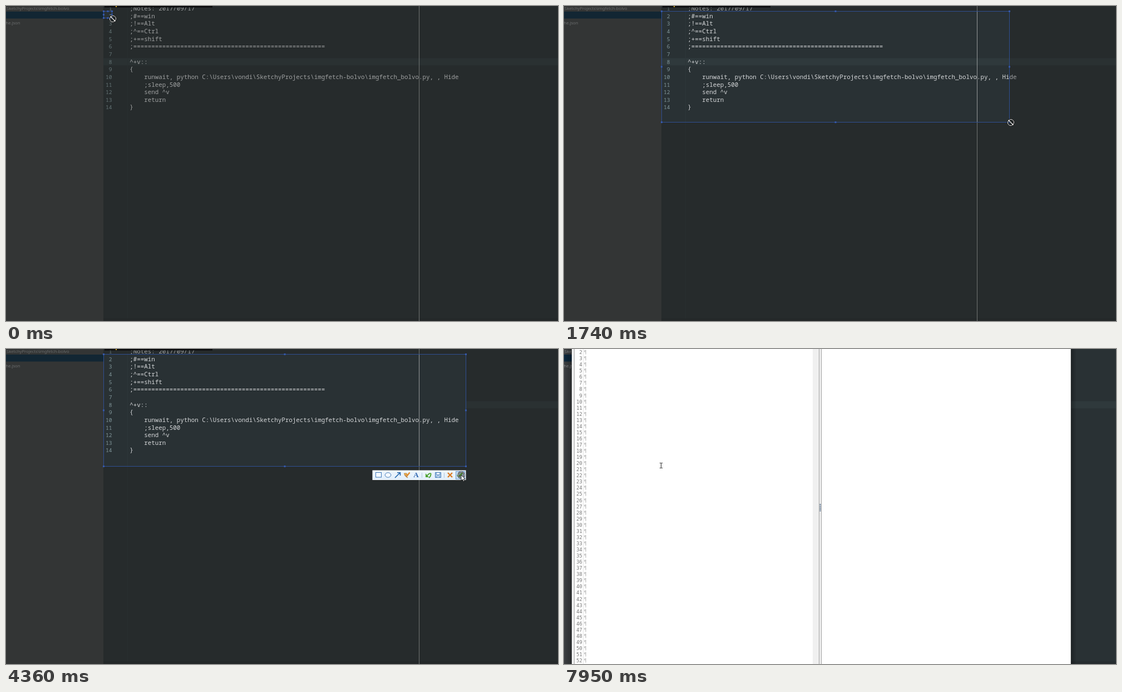
An HTML page that plays this animation: 992x565 px, repeating every 8 s.

```html
<!DOCTYPE html>
<html lang="en">
<head>
<meta charset="utf-8">
<title>Screen capture demo</title>
<style>
  html, body { margin: 0; width: 100%; height: 100%; overflow: hidden; background: #293134; }
  svg { display: block; width: 992px; height: 565px; }
  text { white-space: pre; }
  .code { font: 10.833px "Noto Sans Mono", "Liberation Mono", monospace; fill: #d6d8da; }
  .num { font: 9.7px "Noto Sans Mono", "Liberation Mono", monospace; fill: #81969a; text-anchor: end; }
  .tree { font: 7.6px "Noto Sans", "Open Sans", sans-serif; fill: #8b8e90; }
  .row { font: 8.7px "DejaVu Sans Mono", monospace; fill: #747474; text-anchor: end; }
  .mark { font: 8.7px "DejaVu Sans Mono", monospace; fill: #bdbdbd; }
  .tip { font: 7.5px "Noto Sans CJK SC", "Noto Sans CJK", sans-serif; fill: #555; }
</style>
</head>
<body>
<svg viewBox="0 0 992 565" xmlns="http://www.w3.org/2000/svg">
  <defs>
    <linearGradient id="bar" x2="0" y2="1">
      <stop stop-color="#edf5fd"/><stop offset="1" stop-color="#e2effb"/>
    </linearGradient>
    <linearGradient id="shade">
      <stop stop-color="#000" stop-opacity="0"/><stop offset="1" stop-color="#000" stop-opacity=".3"/>
    </linearGradient>
  </defs>

  <g id="editor">
    <rect width="992" height="565" fill="#293134"/>
    <rect id="current" y="93.5" width="817" height="13" fill="#2f393c"/>
    <rect x="218" width="1" height="560" fill="#2d3639"/>
    <rect width="175" height="565" fill="#3c3f41"/>
    <rect y="10" width="175" height="12.5" fill="#0d293e"/>
    <rect x="175" y="560.5" width="817" height="4.5" fill="#262c2f"/>
    <text class="tree" x="1" y="6.7">SketchyProjects\imgfetch-bolvo</text>
    <text class="tree" x="-.5" y="32.7">he.json</text>
    <g id="lines"></g>
    <rect x="742" width="1" height="565" fill="#959a9b"/>
  </g>

  <g id="capture">
    <path id="dim" fill="#1e1e1c" fill-opacity=".3" fill-rule="evenodd"/>
    <rect x="177" width="194" height="2.5" fill="#08090a"/>
    <rect id="label" x="177" width="21" height="1.6" fill="#fff"/>
    <rect x="197" width="2" height="2" fill="#c9a227"/>
    <path id="frame" fill="none" stroke="#2f4f92"/>
    <path id="grips" fill="#3558a8"/>
    <g id="tools" fill="none" stroke="#3f78b8">
      <rect x="658.5" y="217.5" width="168" height="17.5" fill="#fafdff" stroke="none"/>
      <rect x="659.5" y="218.5" width="166" height="15.5" fill="url(#bar)" stroke="none"/>
      <rect id="hover" x="808.5" y="219.5" width="16" height="14" fill="#c3daf0" stroke="#6f9fcf"/>
      <rect x="664.5" y="221.5" width="10" height="8.5" fill="#f6fbff"/>
      <ellipse cx="686.5" cy="226" rx="5.3" ry="4.2" fill="#f6fbff"/>
      <path d="M699 231L708 222M703 221.7H708.5V227" stroke="#2467ae" stroke-width="1.6"/>
      <path d="M715.5 223H720L721.5 226L716.5 226.5Z" fill="#f0b04a" stroke="#a66a25" stroke-width=".7"/>
      <path d="M725.5 221.5L719 229.5" stroke="#e08a2c" stroke-width="2.4"/>
      <path d="M717 227L722 231" stroke="#b98546" stroke-width="1.4"/>
      <text x="737" y="230.3" text-anchor="middle" font-family="Liberation Serif, serif" font-size="13" font-weight="bold" fill="#2a62ad" stroke="none">A</text>
      <path d="M747.5 222V231M787.5 222V231" stroke="#b4c8db"/>
      <path d="M757 227Q761 222 763.5 223.5Q764 228 760 231" stroke="#4da32f" stroke-width="1.8"/>
      <path d="M754 223V230H760Z" fill="#4da32f" stroke="none"/>
      <path d="M771.5 221.5H781.5V230.5H771.5Z" fill="#b9d3ec"/>
      <path d="M773.5 222V225.5H779.5V222M774 230V228H779V230" fill="#fff" stroke-width=".8"/>
      <path d="M794 222L802 230M802 222L794 230" stroke="#dd7d26" stroke-width="2.4"/>
      <path d="M811 226L814 229L820 222.5" stroke="#62b134" stroke-width="2.6"/>
    </g>
    <g id="tip">
      <rect x="818.5" y="237.5" width="18" height="12" fill="#fff" stroke="#8a8a8a"/>
      <text class="tip" x="820" y="246.3">完成</text>
    </g>
  </g>

  <g id="win">
    <rect width="14" height="565" fill="url(#shade)"/>
    <rect x="911" width="10" height="565" fill="url(#shade)" transform="matrix(-1 0 0 1 1832 0)"/>
    <rect x="14" width="897" height="565" fill="#fff"/>
    <rect x="14" width="4" height="565" fill="#f0f0f0"/>
    <rect x="18" width="1" height="565" fill="#a5a5a5"/>
    <rect x="34" width="1" height="565" fill="#e2e2e2"/>
    <rect x="447" width="11" height="565" fill="#f0f0f0"/>
    <rect x="458" width="5" height="565" fill="#f0f0f0"/>
    <path d="M458.5 0V565M462.5 0V565" stroke="#a0a0a0"/>
    <path d="M460.5 278V291" stroke="#27486f" stroke-width="2" stroke-dasharray="1.2 1.2"/>
    <rect x="910" width="1" height="565" fill="#d5d5d5"/>
    <g id="rows"></g>
    <rect id="caret" x="36" width="1" height="11" fill="#000"/>
  </g>

  <g id="mouse">
    <circle id="ring" r="5.6" fill="#1b1f21" fill-opacity=".35" stroke="#111" stroke-width="2.2"/>
    <circle id="halo" r="5.6" fill="none" stroke="#e8e8e8" stroke-width="1"/>
    <path id="size" d="M-5 -5H-.8L-2.2 -3.4L3.4 2.2L5 .8V5H.8L2.2 3.4L-3.4 -2.2L-5 -.8Z" fill="#fff" stroke="#000" stroke-width=".6"/>
    <path id="arrow" d="M0 0V10L2.4 7.9L4.1 11.7L5.8 11L4.1 7.3H7.3Z" fill="#fff" stroke="#000" stroke-width=".8"/>
    <path id="beam" d="M-2.5 -4.5H-.6L0 -4L.6 -4.5H2.5M0 -4V4M-2.5 4.5H-.6L0 4L.6 4.5H2.5" fill="none"/>
  </g>
</svg>

<script>
const LOOP = 8000, LEFT = 175.5, TOP = 9.5;
const $ = id => document.getElementById(id);
const set = (id, attrs) => { for (const k in attrs) $(id).setAttribute(k, attrs[k]); };
const show = (id, on) => { $(id).style.display = on ? "" : "none"; };

function addText(parent, cls, x, y, content) {
  const el = document.createElementNS("http://www.w3.org/2000/svg", "text");
  el.setAttribute("class", cls);
  el.setAttribute("x", x);
  el.setAttribute("y", y);
  el.textContent = content;
  $(parent).append(el);
}

const code = [
  ";Notes: 2017/09/17", ";#==win", ";!==Alt", ";^==Ctrl", ";+==shift",
  ";" + "=".repeat(53), "", "^+v::", "{",
  "    runwait, python C:\\Users\\vondi\\SketchyProjects\\imgfetch-bolvo\\imgfetch_bolvo.py, , Hide",
  "    ;sleep,500", "    send ^v", "    return", "}"
];
code.forEach((line, i) => {
  const y = 8 + 13.65 * i;
  addText("lines", "num", 190.5, y, i + 1);
  addText("lines", "code", 222.3, y, line);
});

const rowY = n => 6 + 11.06 * (n - 2);
for (let n = 2; n <= 52; n++) {
  addText("rows", "row", 32.8, rowY(n) + 3.1, n);
  addText("rows", "mark", 35.8, rowY(n) + 3.1, "¶");
}

// Pointer stops: [time, x, y]
const drag = [
  [0, 192, 23], [150, 216, 33], [300, 250, 58], [420, 292, 87], [570, 342, 114],
  [690, 387, 140], [850, 464, 162], [1020, 522, 175], [1160, 590, 184],
  [1310, 652, 192], [1430, 712, 200], [1590, 774, 206], [1740, 803, 209],
  [1860, 818, 211], [1980, 824, 212], [2130, 826.5, 211]
];
const stops = [
  ...drag, [2690, 824, 221], [2810, 818, 226],
  [4630, 780, 245], [4750, 712.5, 287.5], [4900, 628, 380], [5030, 547.5, 468.5],
  [5180, 521.5, 546.5], [6480, 415.5, 443.5], [6600, 335.5, 368.5], [6760, 255, 325],
  [6880, 189.5, 291.5], [7030, 182, 275], [7150, 177, 262], [7270, 175, 252],
  [7390, 174.5, 248.5], [7950, 174.5, 209]
];
const within = (t, a, b) => t >= a && t < b;
const indexAt = (list, t) => list.findLastIndex(s => s[0] <= t);

function drawSelection(t) {
  const i = indexAt(drag, t);
  const [, cx, cy] = drag[i];
  const [, px, py] = drag[Math.max(0, i - 1)];
  // The corner trails slightly behind a fast pointer.
  const lag = i === drag.length - 1 ? 0 : 0.075;
  const x = i ? Math.round(cx - lag * (cx - px)) - .5 : 190.5;
  const y = i ? Math.round(cy - lag * (cy - py)) - .5 : 21.5;
  const box = `M${LEFT} ${TOP}H${x}V${y}H${LEFT}Z`;
  set("dim", { d: "M0 0H992V565H0Z" + box });
  set("frame", { d: box });
  const mx = (LEFT + x) / 2, my = (TOP + y) / 2;
  const grips = [[LEFT, TOP], [mx, TOP], [x, TOP], [LEFT, my], [x, my], [LEFT, y], [mx, y], [x, y]];
  set("grips", { d: grips.map(([a, b]) => `M${a - 1.5} ${b - 1.5}h3v3h-3z`).join("") });
}

function drawMouse(t) {
  const [, x, y] = stops[indexAt(stops, t)];
  const pressed = t < 2410 || within(t, 4360, 4510);
  set("mouse", { transform: `translate(${x} ${y})` });
  show("mouse", !within(t, 5300, 6480));
  show("ring", pressed);
  show("halo", pressed);
  show("size", t < 2690);
  show("arrow", within(t, 2690, 4630));
  show("beam", t >= 4630);
  set("beam", { stroke: t < 6050 ? "#e6e6e6" : "#222" });
}

function draw(t) {
  const capturing = t < 4510;
  show("capture", capturing);
  // The finished selection hides the current-line band beneath it.
  set("current", { x: within(t, 2410, 4510) ? 827 : 175 });
  if (capturing) {
    drawSelection(t);
    show("label", within(t, 2410, 2690));
    show("tools", t >= 2410);
    show("hover", t >= 2960);
    show("tip", within(t, 3240, 4360));
    set("tip", { opacity: t < 3390 ? .5 : 1 });
  }
  show("win", t >= 6050);
  show("caret", within(t, 6050, 6480) || within(t, 7030, 7950));
  set("caret", { y: rowY(t < 7390 ? 8 : 24) - 5.4 });
  drawMouse(t);
}

const start = performance.now();
function tick() {
  draw((performance.now() - start) % LOOP);
  requestAnimationFrame(tick);
}
tick();
</script>
</body>
</html>
```
